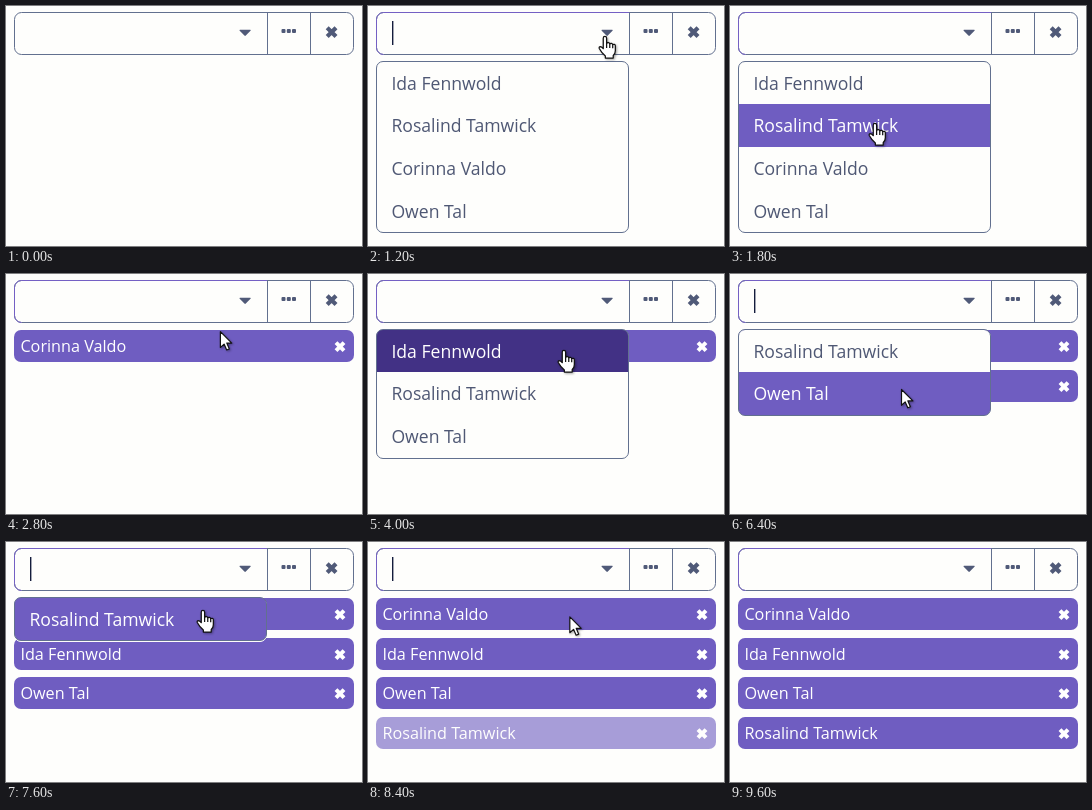
An HTML page for the animation above (9.8 s loop, 356x240 px).

```html
<!DOCTYPE html>
<html lang="en">
<head>
<meta charset="utf-8">
<title>Multi-select dropdown</title>
<style>
  html, body { margin: 0; width: 100%; height: 100%; overflow: hidden; background: #fefefc; }
  svg { display: block; width: 356px; height: 240px; }
  text { font-family: "Open Sans", sans-serif; fill: #4f5874; white-space: pre; }
  .option { font-size: 17.6px; }
  .chip { font-size: 16.2px; }
  .lit, .chip { fill: #fff; }
  .line { fill: none; stroke: #62708f; }
  .focus { fill: none; stroke: #7460c4; }
  .icon { fill: #505a78; }
  .cross { fill: none; stroke: #505a78; stroke-width: 4.2; }
  .chips .cross { stroke: #fff; stroke-width: 4; }
  .pointer { fill: #fff; stroke: #111; stroke-width: 1.2; stroke-linejoin: round;
    filter: drop-shadow(1px 1px 1px rgba(0, 0, 0, .35)); }
</style>
</head>
<body>
<svg viewBox="0 0 356 240">
  <rect class="line" x="8.5" y="6.5" width="339" height="42" rx="7"/>
  <path class="focus" id="focus" d="M261 6.5H15.5a7 7 0 0 0-7 7v28a7 7 0 0 0 7 7"/>
  <path class="line" d="M261.5 7v41M304.5 7v41"/>
  <path class="icon" d="M233.9 23.8h10.4q.9.3.2 1l-4.7 4.8q-.7.6-1.4 0l-4.7-4.8q-.6-.7.2-1z"/>
  <g class="icon">
    <rect x="275.5" y="23" width="4" height="4" rx="1"/>
    <rect x="280.8" y="23" width="4" height="4" rx="1"/>
    <rect x="286" y="23" width="4" height="4" rx="1"/>
  </g>
  <path class="cross" d="M321.2 21.7l8.8 8.8m0-8.8l-8.8 8.8"/>
  <path id="caret" d="M24.7 15v24" stroke="#141c3c" stroke-width="1.4"/>
  <g id="chips" class="chips"></g>
  <g id="menu"></g>
  <path id="hand" class="pointer" d="M5 13V3a1.6 1.6 0 0 1 3.2 0v5.5a1.5 1.5 0 0 1 3 .3 1.5 1.5 0 0 1 2.8.6 1.4 1.4 0 0 1 2.5.9V15q0 3-2 4.5V22H7v-2Q3.5 17 1.2 12.8q-.4-1.6 1-1.8 1.2 0 2.8 2zM8.2 8.5v4M11.2 9v3.5M14 9.6v3"/>
  <path id="arrow" class="pointer" d="M.5.5v15.8l3.7-3.4 2.6 5.9 2.6-1.1-2.5-5.8h5z"/>
</svg>
<script>
const LOOP = 9800, STEP = 200, ROW = 42.67, MENU_TOP = 55.5;
const people = ['Ida Fennwold', 'Rosalind Tamwick', 'Corinna Valdo', 'Owen Tal'];

// Each round: menu opens, option is pressed, menu closes, chip arrives.
const rounds = [
  { who: 2, open: 1000, press: 2200, close: 2400, chip: 2400 },
  { who: 0, open: 3200, press: 4000, close: 4400, chip: 4800 },
  { who: 3, open: 5200, press: 6200, close: 6600, chip: 7000 },
  { who: 1, open: 7400, press: 7800, close: 8200, chip: 8400 }
];

// time, x, y of the pointer tip
const path = [
  [200, 302, 118], [800, 239, 24], [1200, 238, 30], [1800, 146, 117],
  [2000, 145, 150], [2400, 145, 152], [3000, 238, 24], [3200, 238, 26],
  [3800, 197, 76], [4400, 197, 76], [5000, 238, 24], [5200, 236, 27],
  [5400, 212, 59], [5800, 171, 115], [6600, 171, 115], [7200, 238, 22],
  [7400, 232, 30], [7600, 198, 68], [8200, 198, 68], [9200, 230, 130]
];

const $ = id => document.getElementById(id);
const show = (el, on) => el.style.display = on ? '' : 'none';
const within = (t, from, to) => t >= from && t < to;

function pointerAt(t) {
  const i = path.findIndex(p => p[0] > t);
  if (i < 1) return null;
  const [t0, x0, y0] = path[i - 1], [t1, x1, y1] = path[i];
  const k = (t - t0) / (t1 - t0), e = k * k * (3 - 2 * k);
  return { x: x0 + (x1 - x0) * e, y: y0 + (y1 - y0) * e };
}

function chipMarkup(round, i, t) {
  if (t < round.chip) return '';
  const y = Math.round(56 + i * 39.67);
  return `<g transform="translate(0 ${y})" opacity="${t < round.chip + STEP ? .6 : 1}">
    <rect x="8" width="340" height="32" rx="7" fill="#6f5dc1"/>
    <text class="chip" x="14.4" y="22">${people[round.who]}</text>
    <path class="cross" d="M330 12.6l8 8m0-8l-8 8"/></g>`;
}

function menuMarkup(options, hovered, pressed) {
  const height = Math.round(options.length * ROW + .5);
  const frame = `x="8.5" width="252" height="${height}" rx="6.5"`;
  const edge = i => Math.round(MENU_TOP + i * ROW);
  const rows = options.map((who, i) => {
    const lit = i === hovered;
    const fill = lit ? `<rect x="8" y="${edge(i)}" width="253" height="${edge(i + 1) - edge(i)}" fill="${pressed ? '#423185' : '#6f5dc1'}"/>` : '';
    return `${fill}<text class="option ${lit ? 'lit' : ''}" x="23.4" y="${MENU_TOP + 28 + i * ROW}">${people[who]}</text>`;
  }).join('');
  // The lower rect leaves a pale rim where the menu overlaps chips.
  return `<clipPath id="clip"><rect ${frame} y="${MENU_TOP}"/></clipPath>
    <rect ${frame} y="${MENU_TOP + 1}" fill="#fefefc" stroke="#fefefc"/>
    <g clip-path="url(#clip)">${rows}</g><rect class="line" ${frame} y="${MENU_TOP}"/>`;
}

function caretOn(t) {
  if (t < 1000) return false;
  return within(t, 7000, 8200) ? within(t, 7200, 7700) : within(t % 1000, 100, 600);
}

function render(t) {
  const tip = pointerAt(t);
  const current = rounds.findIndex(r => within(t, r.open, r.close));
  let overOption = false, menu = '';

  if (current >= 0) {
    const taken = rounds.slice(0, current).map(r => r.who);
    const options = people.map((_, i) => i).filter(i => !taken.includes(i));
    const hovered = tip ? Math.floor((tip.y - MENU_TOP) / ROW) : -1;
    overOption = hovered >= 0 && hovered < options.length;
    menu = menuMarkup(options, hovered, within(t, rounds[current].press, rounds[current].press + STEP));
  }

  $('menu').innerHTML = menu;
  $('chips').innerHTML = rounds.map((r, i) => chipMarkup(r, i, t)).join('');
  show($('focus'), t >= 1000);
  show($('caret'), caretOn(t));

  const overButton = tip && tip.y < 49 && tip.x > 220;
  const isHand = (overOption && !within(t, 6400, 6600)) || overButton;
  show($('hand'), tip && isHand);
  show($('arrow'), tip && !isHand);
  if (tip) {
    $('hand').setAttribute('transform', `translate(${tip.x - 8} ${tip.y - 1}) scale(1.05)`);
    $('arrow').setAttribute('transform', `translate(${tip.x} ${tip.y})`);
  }
}

const start = performance.now();
let last = -1;
function tick() {
  const t = Math.floor((performance.now() - start) % LOOP / STEP) * STEP;
  if (t !== last) render(last = t);
  requestAnimationFrame(tick);
}
tick();
</script>
</body>
</html>
```
